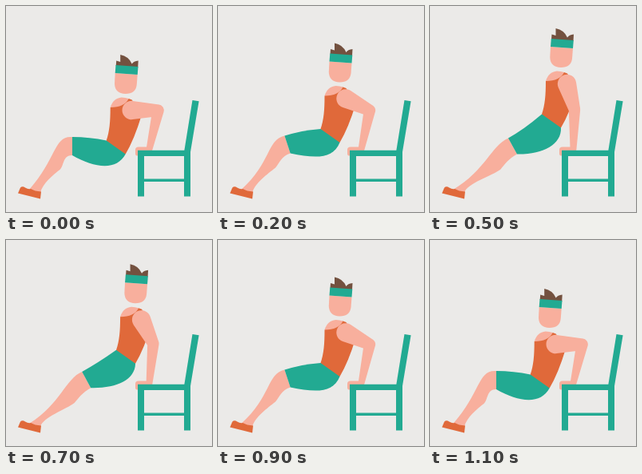
An HTML page that plays this animation: 258x258 px, repeating every 1200 ms.

```html
<!DOCTYPE html>
<html lang="en">
<head>
<meta charset="utf-8">
<title>Chair dips</title>
<style>
  html, body { margin: 0; width: 100%; height: 100%; overflow: hidden; background: #ebeae8; }
  svg { display: block; width: 100vw; height: 100vh; }
  .skin { fill: #f8af9d; }
  .green { fill: #22aa92; }
  .orange { fill: #e0693a; }
  .brown { fill: #73513f; }
</style>
</head>
<body>
<svg viewBox="0 0 258 258">
  <path id="shin" class="skin"/>
  <path class="orange" d="M15 234.500L18 227.500Q20.500 225 24 227.500Q28 230 31 229Q36 232 44 232.500L43 241.500Z"/>
  <path id="shorts" class="green"/>
  <g id="body">
    <path class="orange" d="M145 94L168 83L172 84.500L184 104Q175 134 164 152.500L140 135.500C144 124 145 112 145 94Z"/>
    <path class="skin" d="M145 94C147 87 152 82 159 81.500Q164 81.500 168 83C164 91 157 93.500 145 94Z"/>
    <path class="skin" d="M151 51L179 53L178 66Q176.500 77 164 77Q150.500 76.500 150.300 64Z"/>
    <path class="brown" d="M152 42L152.500 35.500L157.500 37L157.500 28Q168 30 172 39.500Q174 36 180 35.500L179.500 44Z"/>
    <path class="green" d="M151.800 41L179.800 43L179 53L151 51Z"/>
  </g>
  <path id="arm" class="skin"/>
  <path class="skin" d="M162 185V180Q162 176.500 166 176.500H182V184H166V187.500Q162 188 162 185Z"/>
  <g class="green">
    <path d="M233.500 118L241.600 119.300L230.800 184L223 183Z"/>
    <path d="M165 180.700H231V238.600H223V188H173V238.600H165Z"/>
    <path d="M172 216.600H224V220H172Z"/>
  </g>
</svg>
<script>
const STEP = 100;
const STEPS = 12;
const DROP = { x: -14.3, y: 33 };   // body offset at the lowest point
const SHOULDER = [171.5, 97.5], WAIST_FRONT = [140, 135.5], WAIST_BACK = [164, 152.5];
const WRIST = [179.5, 179.5];
const UPPER_ARM = 33.4, FOREARM = 50;

const el = id => document.getElementById(id);
const add = ([x, y], dx, dy) => [x + dx, y + dy];
const polar = ([x, y], r, a) => [x + r * Math.cos(a), y + r * Math.sin(a)];

// Outline around two circles of different size.
function limb(p, r, q, s) {
  const dx = q[0] - p[0], dy = q[1] - p[1];
  const a = Math.atan2(dy, dx);
  const b = Math.acos((r - s) / Math.hypot(dx, dy));
  return `M${polar(p, r, a + b)}L${polar(q, s, a + b)}A${s} ${s} 0 0 0 ${polar(q, s, a - b)}` +
    `L${polar(p, r, a - b)}A${r} ${r} 0 1 0 ${polar(p, r, a + b)}Z`;
}

// The elbow follows from the fixed bone lengths.
function elbowFor(shoulder) {
  const dx = WRIST[0] - shoulder[0], dy = WRIST[1] - shoulder[1];
  const reach = Math.hypot(dx, dy);
  const cos = (UPPER_ARM ** 2 + reach ** 2 - FOREARM ** 2) / (2 * UPPER_ARM * reach);
  return polar(shoulder, UPPER_ARM, Math.atan2(dy, dx) - Math.acos(Math.min(1, cos)));
}

function pose(rise) {
  const swing = rise ** 2;
  const shift = [DROP.x * (1 - swing), DROP.y * (1 - rise)];
  const onBody = p => add(p, ...shift);
  el('body').setAttribute('transform', `translate(${shift})`);

  const shoulder = onBody(SHOULDER);
  const elbow = elbowFor(shoulder);
  el('arm').setAttribute('d', limb(shoulder, 11.7, elbow, 7.2) + limb(elbow, 7.2, WRIST, 3.9));

  // Thigh space: origin at the middle of the hem, x axis towards the hip.
  const tilt = -0.5 * Math.sin(rise * Math.PI / 2);
  const hem = [83 + 20.5 * swing, 175.5 - 2 * Math.sin(Math.PI * rise)];
  const thigh = (x, y) => polar(hem, Math.hypot(x, y), Math.atan2(y, x) + tilt);
  const hemTop = thigh(0, -11.5), hemBottom = thigh(0, 11.5);

  const front = onBody(WAIST_FRONT), back = onBody(WAIST_BACK);
  el('shorts').setAttribute('d',
    `M${hemTop}Q${thigh(22, -11.5)} ${front}L${onBody([158, 138])}L${back}` +
    `C${add(back, 12 * swing - 11, 21)} ${thigh(28, 27.5)} ${hemBottom}Z`);

  const calf = add(hem, -15, 29);
  el('shin').setAttribute('d',
    `M${hemTop}C${thigh(-23, -13.5)} ${64 + 6 * rise},${190 + 15 * rise} 29,230L43,234` +
    `C46,222 ${add(calf, -10, 8)} ${calf}C${add(calf, 5, -6)} ${thigh(-12, 11.5)} ${hemBottom}Z`);
}

function draw() {
  const k = Math.floor(performance.now() / STEP) % STEPS;
  const progress = Math.min(k, STEPS - 1 - k) / (STEPS / 2 - 1);
  pose(Math.sin(Math.PI / 2 * progress ** 0.84) ** 2);
  requestAnimationFrame(draw);
}
draw();
</script>
</body>
</html>
```
